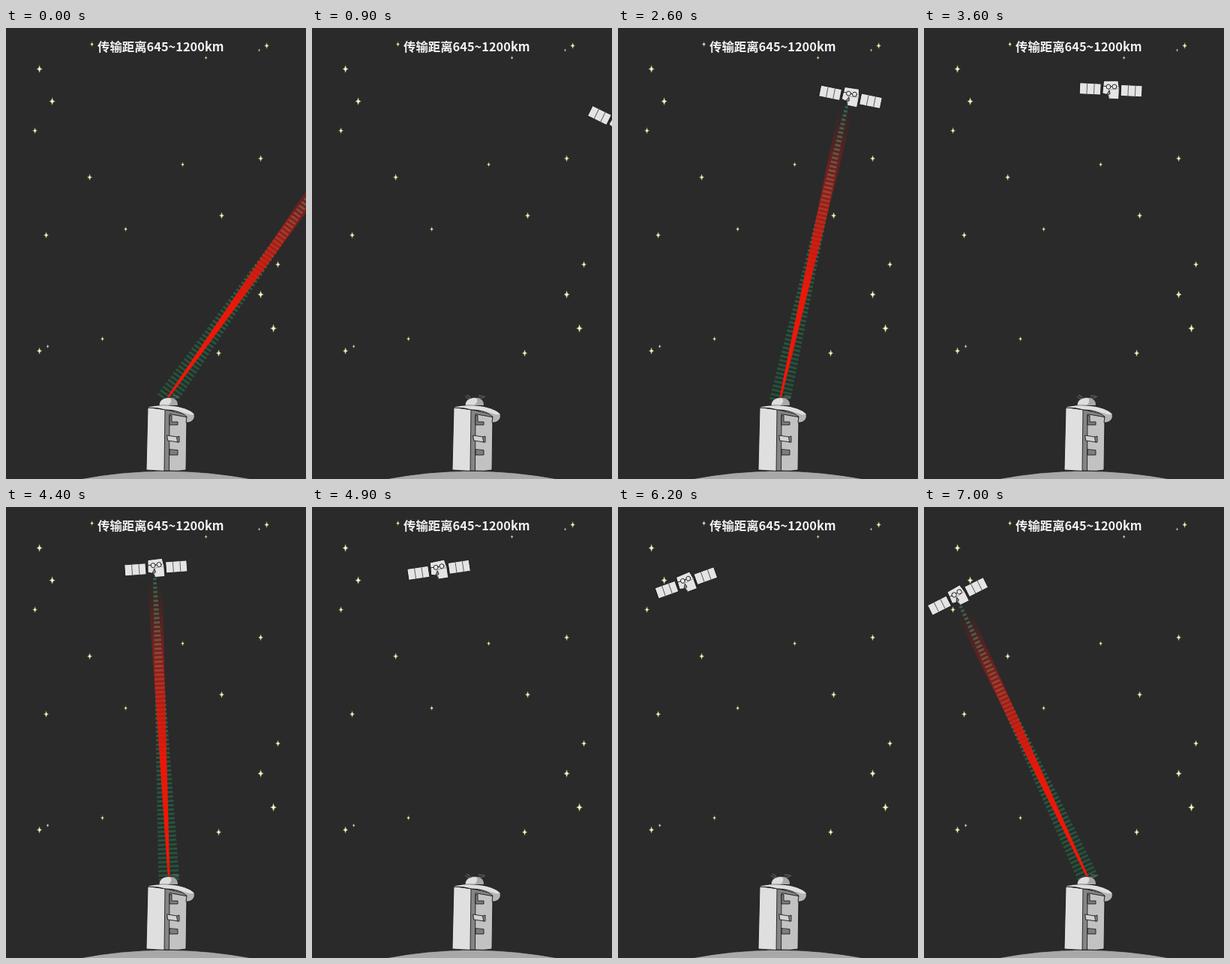
Recreate the animation shown at these times as an HTML page. Size 400 by 600 pixels, loop 7100 ms.

```html
<!DOCTYPE html>
<html lang="zh-CN">
<head>
<meta charset="utf-8">
<style>
  html, body { margin: 0; width: 100%; height: 100%; overflow: hidden; background: #2a2a2a; }
  svg { display: block; width: 400px; height: 600px; }
  .title { font: 700 16.4px "Noto Sans CJK SC", "Noto Sans CJK", "Noto Sans", sans-serif; fill: #f2f2f2; }
  .ink { stroke: #1c1c1c; stroke-width: .9; stroke-linejoin: round; stroke-linecap: round; }
</style>
</head>
<body>
<svg viewBox="0 0 400 600">
  <defs>
    <linearGradient id="red" gradientUnits="userSpaceOnUse" x1="0" y1="0" x2="0" y2="-392">
      <stop offset="0" stop-color="#f51505"/>
      <stop offset=".38" stop-color="#f01608" stop-opacity=".96"/>
      <stop offset=".55" stop-color="#e41509" stop-opacity=".82"/>
      <stop offset=".74" stop-color="#d0140f" stop-opacity=".52"/>
      <stop offset=".9" stop-color="#b01414" stop-opacity=".22"/>
      <stop offset="1" stop-color="#901414" stop-opacity="0"/>
    </linearGradient>
    <linearGradient id="green" gradientUnits="userSpaceOnUse" x1="0" y1="0" x2="0" y2="-396">
      <stop offset="0" stop-color="#22533a"/>
      <stop offset=".45" stop-color="#285a41"/>
      <stop offset=".7" stop-color="#4a8060"/>
      <stop offset="1" stop-color="#34614a"/>
    </linearGradient>
    <clipPath id="cone"><path d="M-14 7L14 7L2.2 -396L-2.2 -396Z"/></clipPath>
  </defs>

  <rect width="400" height="600" fill="#2a2a2a"/>
  <g id="stars" fill="#f8f5cf" stroke="#6d6b3c" stroke-width=".6" transform="translate(-.4 -.4)"></g>

  <g id="beam">
    <g clip-path="url(#cone)">
      <path d="M0 7V-396" stroke="url(#green)" stroke-width="32" stroke-dasharray="3 2.8" fill="none"/>
    </g>
    <path d="M-1.300 2L1.300 2L9.800 -392L-9.800 -392Z" fill="url(#red)"/>
  </g>

  <g id="craft" class="ink" fill="#e4e4e4">
    <path d="M-14 0H14" fill="none"/>
    <path d="M-41.500 -7.500H-13.500V7.500H-41.500ZM13.500 -7.500H41.500V7.500H13.500Z"/>
    <path d="M-32 -7.500V7.500M-22.500 -7.500V7.500M23 -7.500V7.500M32.500 -7.500V7.500" fill="none" stroke="#555"/>
    <path d="M-10 -11.500L9 -12.500L11 -2V12H-2L-4 7L-11 5Z"/>
    <path d="M-3 0L11 -2M-3 0L-2 12" fill="none" stroke="#777" stroke-width=".6"/>
    <path d="M-10 -4.500H-6M-1 -4.500H1" fill="none"/>
    <circle cx="-3.500" cy="-4" r="3"/>
    <circle cx="4.500" cy="-4.500" r="3"/>
    <path d="M-6 7L-2 1L-1 5Z" fill="#999"/>
  </g>

  <path d="M96 600.500Q212 578 330 600.500Z" fill="#a8a8a8" stroke="#1c1c1c" stroke-width=".7"/>
  <g class="ink">
    <path d="M204 502C204 488 229 488 229 502Z" fill="#dedede"/>
    <path d="M219 492C228 493 229 498 229 502H216C221 499 221 495 219 492Z" fill="#a9a9a9" stroke="none"/>
    <path d="M189 505L187 588Q214 591 240 588L241 512Z" fill="#dfdfdf"/>
    <path d="M212 508L211 589Q227 590 240 588L241 515Z" fill="#858585"/>
    <path d="M218 514L217.500 589Q230 590 240 588L241 518Z" fill="#c2c2c2"/>
    <path d="M189 505C202 500 240 501 251 514C253 520 247 526 240 525L241 517C232 509 218 508 212 508Q200 504 189 505Z" fill="#b5b5b5"/>
    <path d="M189 505C202 500 240 501 251 514C241 516 236 508 212 507Q200 504 189 505Z" fill="#dfdfdf" stroke="none"/>
    <path d="M218 516V528H229V524H221V516ZM218 561V568H229V562Z" fill="#7d7d7d"/>
    <path d="M215 542L228 544L230 551L216 549Z" fill="#d2d2d2"/>
    <path d="M228 544L231 543V551H229Z" fill="#8a8a8a"/>
  </g>
  <g fill="none" stroke="#777" stroke-width=".9">
    <path id="leftMark" d="M204 490Q207 494 212 493M206 488L211 491"/>
    <path d="M221 492Q227 494 231 490M222 489L229 490"/>
  </g>

  <text class="title" x="122" y="31">传输距离645~1200km</text>
</svg>
<script>
  const LOOP = 7100, STEP = 100, RADIUS = 409;
  const START_ANGLE = 35.7, TURN = -8.64; // degrees, degrees per second
  const BEAM_LEAN = -0.4, CRAFT_TILT = -1.8; // degrees off the orbit radius
  const BLINK = 1400, OFF_FROM = 300, OFF_TO = 1000;
  const get = id => document.getElementById(id);
  const beam = get('beam'), craft = get('craft'), leftMark = get('leftMark');

  const stars = [
    [115, 22, 3.2], [348, 24, 4], [338, 30, 2], [267, 40, 2.4], [45, 55, 5],
    [62, 98, 5], [39, 137, 4], [236, 182, 3], [340, 174, 4.2], [112, 199, 4.2],
    [288, 250, 4.3], [54, 276, 4.2], [160, 268, 3], [363, 315, 4.2], [340, 355, 5],
    [357, 400, 5.4], [129, 414, 3], [45, 430, 4.5], [56, 424, 2.4], [284, 433, 4.5]
  ];
  const starPath = ([x, y, r]) => {
    const a = r * .76, b = r * .26;
    return `M${x} ${y - r}L${x + b} ${y - b}L${x + a} ${y}L${x + b} ${y + b}` +
           `L${x} ${y + r}L${x - b} ${y + b}L${x - a} ${y}L${x - b} ${y - b}Z`;
  };
  get('stars').innerHTML = `<path d="${stars.map(starPath).join('')}"/>`;

  const aim = angle => `translate(217 490) rotate(${angle})`;

  function draw(now) {
    const t = Math.floor(now % LOOP / STEP) * STEP;
    const angle = START_ANGLE + TURN * t / 1000;
    const phase = t % BLINK;
    const lit = phase < OFF_FROM || phase >= OFF_TO;
    craft.setAttribute('transform', `${aim(angle)} translate(-.5 ${-RADIUS}) rotate(${CRAFT_TILT})`);
    beam.setAttribute('transform', aim(angle + BEAM_LEAN));
    beam.setAttribute('visibility', lit ? 'visible' : 'hidden');
    leftMark.setAttribute('visibility', lit ? 'hidden' : 'visible');
  }
  function tick() {
    draw(performance.now());
    requestAnimationFrame(tick);
  }
  tick();
</script>
</body>
</html>
```
